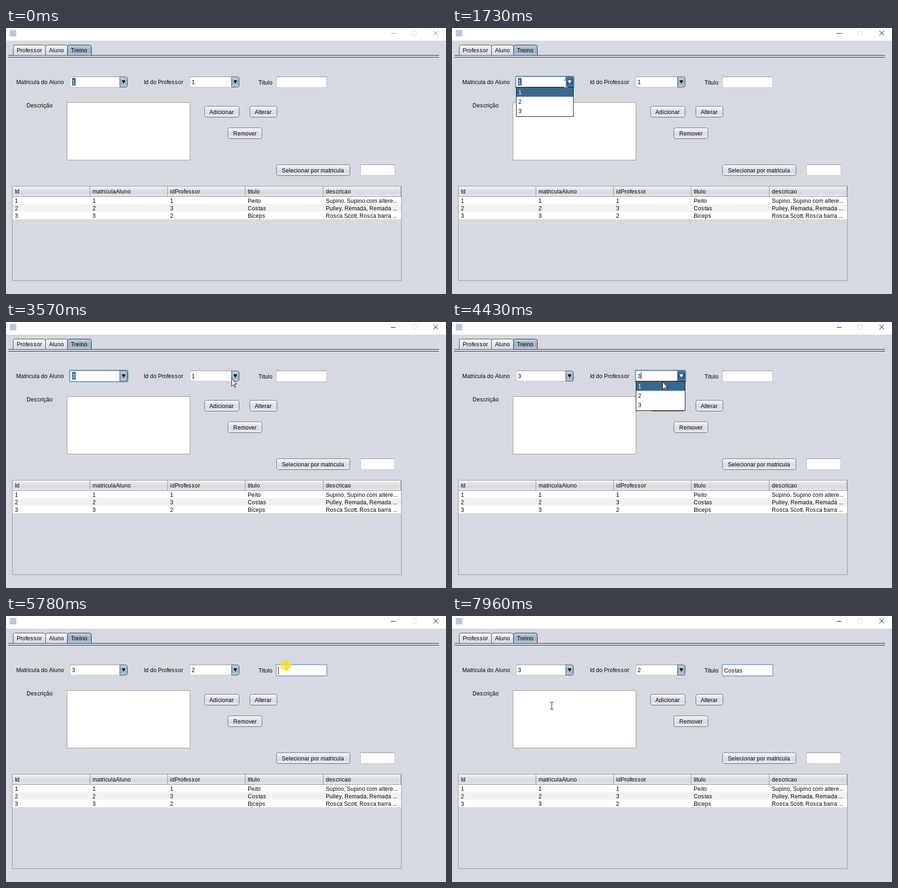
Animation of 941 by 569 pixels, one loop 8 s. Source, as an HTML page with a canvas:

```html
<!DOCTYPE html>
<html lang="pt">
<head>
<meta charset="utf-8">
<title>Treino</title>
<style>
  html, body { margin: 0; width: 100%; height: 100%; overflow: hidden; background: #d6d9df; }
  canvas { display: block; }
</style>
</head>
<body>
<canvas id="stage" width="941" height="569"></canvas>
<script>
const ctx = document.getElementById('stage').getContext('2d');
const LOOP = 8000;
const BG = '#d6d9df', SELECT = '#39698a', FOCUS = '#73a4d1', NAVY = '#17172f';
const PLAIN = ['#fbfbfc', '#e3e5ea', '#d8dbe1', '#f0f1f4'];
const BLUE = ['#cbd8e4', '#a5bacb', '#9bb3c6', '#bfd3e2'];
const PRESSED = ['#5d87a8', '#36617f', '#34607f', '#5588a8'];

// [time, x, y]
const PATH = [
  [170, 820, 544], [410, 296, 151], [580, 296, 151], [800, 250, 117],
  [1400, 250, 117], [1480, 243, 119], [2020, 243, 119], [2220, 232, 160],
  [2430, 232, 160], [2710, 224, 178], [2790, 224, 188], [2950, 224, 188],
  [3570, 482, 121], [3730, 486, 117], [3850, 486, 117], [4160, 462, 170],
  [4430, 450, 128], [4590, 450, 131], [4900, 450, 156], [5290, 450, 156],
  [5700, 599, 106], [5840, 599, 106], [5980, 691, 110], [7640, 691, 110],
  [7700, 706, 58], [7960, 213, 192]
];
const CLICKS = [[800, 940], [2770, 2950], [3770, 3860], [4960, 5050], [5720, 5860]];
const KEYS = [6690, 6850, 6980, 7150, 7230, 7430];
const ROWS = [
  ['1', '1', '1', 'Peito', 'Supino, Supino com altere...'],
  ['2', '2', '3', 'Costas', 'Pulley, Remada, Remada ...'],
  ['3', '3', '2', 'Biceps', 'Rosca Scott, Rosca barra ...']
];
const HEADERS = ['Id', 'matriculaAluno', 'idProfessor', 'titulo', 'descricao'];
const COLUMNS = [13, 179, 345, 511, 678];

const within = (t, from, to) => t >= from && t < to;

function rect(x, y, w, h, color) {
  ctx.fillStyle = color;
  ctx.fillRect(x, y, w, h);
}

function box(x, y, w, h, fill, border) {
  rect(x, y, w, h, border);
  rect(x + 1, y + 1, w - 2, h - 2, fill);
}

function line(x1, y1, x2, y2, color) {
  ctx.strokeStyle = color;
  ctx.beginPath();
  ctx.moveTo(x1, y1);
  ctx.lineTo(x2, y2);
  ctx.stroke();
}

function polygon(points, fill) {
  ctx.beginPath();
  points.forEach(([x, y]) => ctx.lineTo(x, y));
  ctx.closePath();
  ctx.fillStyle = fill;
  ctx.fill();
}

function gradient(y, h, colors) {
  const g = ctx.createLinearGradient(0, y, 0, y + h);
  colors.forEach((c, i) => g.addColorStop(i / (colors.length - 1), c));
  return g;
}

function panel(x, y, w, h, radius, colors, border) {
  ctx.beginPath();
  ctx.roundRect(x + .5, y + .5, w - 1, h - 1, radius);
  ctx.fillStyle = gradient(y, h, colors);
  ctx.fill();
  ctx.strokeStyle = border;
  ctx.stroke();
}

// Glyph advances snap to whole pixels, as hinted desktop text does.
const advance = ch => ch === 's' ? 7 : Math.round(ctx.measureText(ch).width);
const textWidth = str => [...str].reduce((sum, ch) => sum + advance(ch), 0);

function text(str, x, y, color = '#000') {
  ctx.fillStyle = color;
  for (const ch of str) {
    ctx.fillText(ch, x, y);
    x += advance(ch);
  }
}

function centered(str, x, y, w) {
  text(str, Math.floor(x + (w - textWidth(str)) / 2), y);
}

function button(label, x, y, w) {
  rect(x + 3, y + 24, w - 6, 1, '#c4c8cf');
  panel(x, y, w, 24, 4, PLAIN, '#5f6b78');
  centered(label, x, y + 17, w);
}

function field(x, y, w, h, focused) {
  if (focused) rect(x - 1, y - 1, w + 2, h + 2, FOCUS);
  box(x, y, w, h, '#fff', focused ? '#8fb6da' : '#bfc2c8');
  if (!focused) rect(x, y, w, 1, '#8d8e8f');
}

function combo(x, w, s) {
  if (s.focused) {
    ctx.beginPath();
    ctx.roundRect(x - 2, 102, w + 4, 27, 3);
    ctx.fillStyle = FOCUS;
    ctx.fill();
  }
  field(x, 104, w - 16, 23, false);
  const bx = x + w - 17;
  panel(bx, 104, 17, 23, [0, 4, 4, 0], s.open ? PRESSED : BLUE, '#2b4358');
  polygon([[bx + 4.5, 112], [bx + 12.5, 112], [bx + 8.5, 119]], s.open ? '#fff' : '#000');
  if (s.selected) rect(x + 4, 107, 8, 16, SELECT);
  text(s.value, x + 4, 120, s.selected ? '#fff' : '#000');
  if (s.caret !== undefined) rect(x + 4 + s.caret, 107, 1, 16, '#000');
}

function popup(x, w, dx, hover) {
  box(x, 126, w, 64, '#fff', '#000');
  rect(x + 1, 127 + hover * 20, w - 2, 20, SELECT);
  for (let i = 0; i < 3; i++)
    text(String(i + 1), x + dx, 142 + i * 20, i === hover ? '#fff' : '#000');
}

function windowFrame(active) {
  rect(0, 0, 941, 569, BG);
  rect(0, 0, 941, 27, '#fff');
  rect(8, 4, 14, 14, '#b9c8d6');
  const ink = active ? '#000' : '#8c8c8c';
  rect(823, 11, 10, 1, ink);
  box(868, 6, 10, 10, '#fff', '#d9d9d9');
  line(914, 6, 924, 16, ink);
  line(924, 6, 914, 16, ink);
}

function tabs() {
  rect(5, 58, 921, 1, NAVY);
  rect(5, 59, 921, 3, '#dcdfe5');
  rect(5, 62, 921, 1, NAVY);
  [['Professor', 15, 70], ['Aluno', 84, 48], ['Treino', 131, 52]].forEach(([label, x, w], i) => {
    const chosen = i === 2;
    panel(x, 36, w, 23, [4, 4, 0, 0], chosen ? BLUE : PLAIN.slice(0, 3), chosen ? '#20144a' : '#3a3f52');
    centered(label, x, 52, w);
  });
}

function table() {
  box(13, 338, 833, 203, BG, '#929297');
  rect(14, 339, 831, 21, gradient(339, 21, ['#f4f5f7', '#dfe2e7', '#d6d9df', '#e6e8ec']));
  rect(14, 360, 831, 1, '#8a8f98');
  [179, 345, 511, 678, 844].forEach(x => rect(x, 339, 1, 22, '#8a8f98'));
  ROWS.forEach((row, r) => {
    rect(14, 361 + r * 16, 831, 16, r % 2 ? '#f2f2f2' : '#fff');
    row.forEach((cell, c) => text(cell, COLUMNS[c] + 6, 374 + r * 16));
  });
  HEADERS.forEach((label, c) => text(label, COLUMNS[c] + 6, 354));
}

function pointerAt(t) {
  if (t < PATH[0][0]) return null;
  const next = PATH.findIndex(p => p[0] > t);
  const [t1, x1, y1] = PATH[next < 0 ? PATH.length - 1 : next];
  if (next < 0) return { x: x1, y: y1 };
  const [t0, x0, y0] = PATH[next - 1];
  const u = (t - t0) / (t1 - t0), k = u * u * (3 - 2 * u);
  return { x: Math.round(x0 + (x1 - x0) * k), y: Math.round(y0 + (y1 - y0) * k) };
}

function overText({ x, y }, menuOpen) {
  if (menuOpen && y >= 126) return false;
  const inside = (l, t, r, b) => x >= l && x <= r && y >= t && y <= b;
  return inside(138, 104, 243, 126) || inside(394, 104, 481, 126) ||
    inside(578, 104, 685, 127) || inside(130, 159, 393, 282);
}

function pointer(p, beam) {
  const { x, y } = p;
  if (beam) {
    ctx.globalCompositeOperation = 'difference';
    rect(x, y - 7, 1, 14, '#fff');
    for (const end of [y - 8, y + 7]) {
      rect(x - 3, end, 3, 1, '#fff');
      rect(x + 1, end, 3, 1, '#fff');
    }
    ctx.globalCompositeOperation = 'source-over';
    return;
  }
  const shape = [[.5, .5], [.5, 16.5], [4.2, 13], [7, 18.8], [9, 18], [6.6, 12], [11.5, 11.7]];
  polygon(shape.map(([dx, dy]) => [x + dx, y + dy]), '#fff');
  ctx.strokeStyle = '#000';
  ctx.stroke();
}

function draw(t) {
  const p = pointerAt(t);
  const hover = p ? Math.max(0, Math.min(2, Math.floor((p.y - 127) / 20))) : 0;
  const alunoOpen = within(t, 900, 2950), profOpen = within(t, 3850, 5040);

  windowFrame(t >= 830);
  tabs();
  text('Matricula do Aluno', 22, 120);
  text('Id do Professor', 295, 120);
  text('Titulo', 540, 121);
  text('Descrição', 44, 170);
  box(130, 159, 264, 124, '#fff', '#929297');
  button('Adicionar', 424, 167, 75);
  button('Alterar', 521, 167, 59);
  button('Remover', 474, 213, 74);
  button('Selecionar por matricula', 578, 292, 158);
  field(758, 292, 74, 24, false);
  table();

  combo(137, 123, {
    focused: within(t, 830, 3790),
    open: alunoOpen,
    value: t < 900 ? '1' : alunoOpen ? String(hover + 1) : '3',
    selected: t < 2950 ? t < 900 || hover === 0 : t < 3790,
    caret: within(t, 1480, 1730) ? 0 : undefined
  });
  combo(393, 106, {
    focused: within(t, 3790, 5740),
    open: profOpen,
    value: t < 3850 ? '1' : t < 4160 ? String(hover + 1) : t < 4590 ? '3' : '2',
    selected: within(t, 3790, 3950) || within(t, 5040, 5740),
    caret: within(t, 4160, 4590) ? 7 : undefined
  });

  field(578, 104, 108, 24, t >= 5740);
  const typed = 'Costas'.slice(0, KEYS.filter(k => t >= k).length);
  text(typed, 582, 121);
  if (within(t, 5740, 6270) || within(t, 6690, 7930))
    rect(582 + textWidth(typed), 108, 1, 16, '#000');

  if (alunoOpen) popup(137, 123, 5, hover);
  if (profOpen) popup(393, 106, 5, hover);
  if (!p) return;
  pointer(p, overText(p, alunoOpen || profOpen));
  if (CLICKS.some(([from, to]) => within(t, from, to))) {
    ctx.beginPath();
    ctx.arc(p.x - 1, p.y - 1, 12, 0, Math.PI * 2);
    ctx.fillStyle = 'rgba(240, 228, 50, .75)';
    ctx.fill();
  }
}

ctx.font = '12px "Liberation Sans", Arial, sans-serif';
const start = performance.now();
function frame() {
  draw((performance.now() - start) % LOOP);
  requestAnimationFrame(frame);
}
frame();
</script>
</body>
</html>
```
